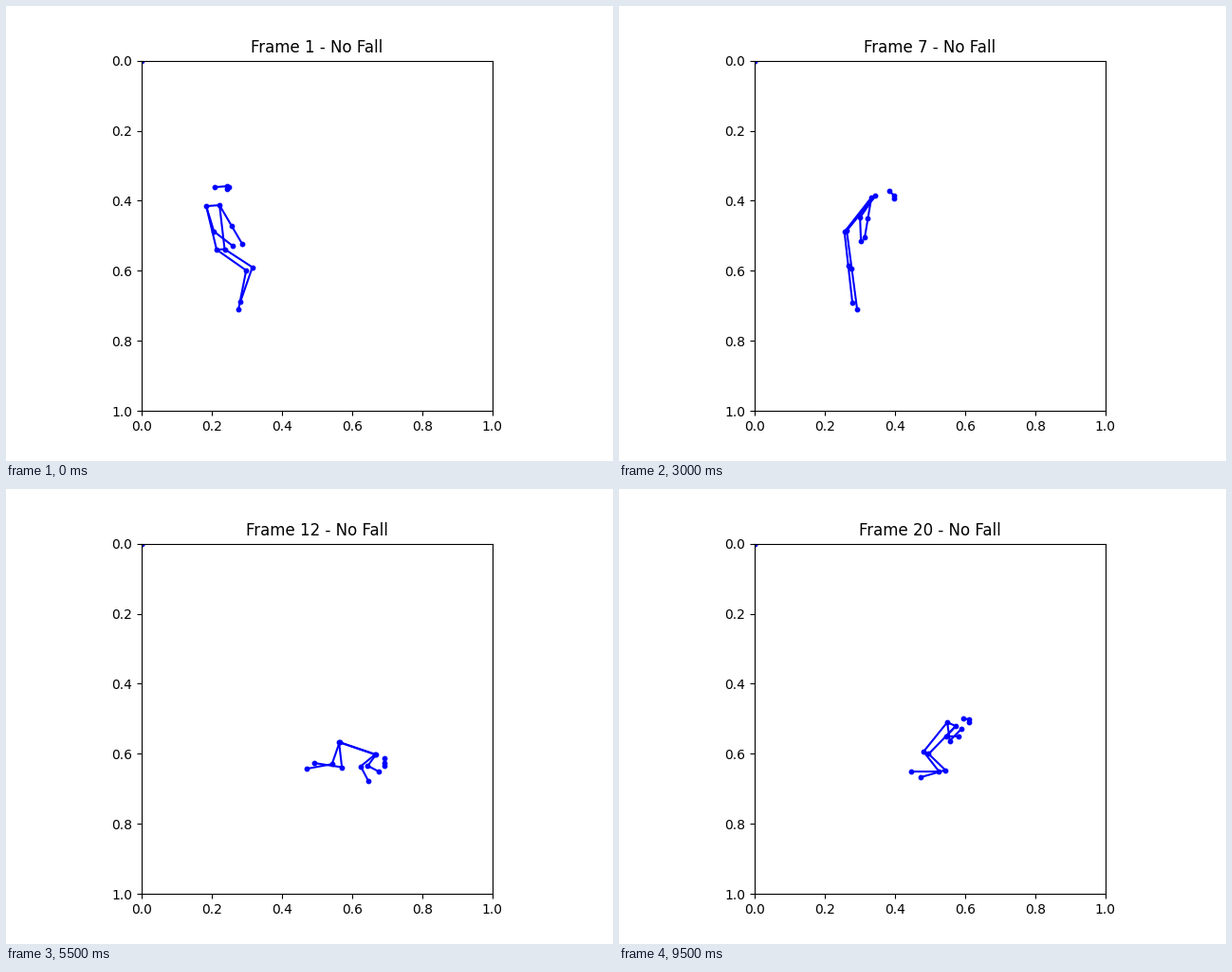
Write a matplotlib script that moves like this. It is 640 by 480 pixels and loops after 10000 ms.

```python
import math

import numpy as np
import matplotlib.pyplot as plt
from matplotlib.animation import FuncAnimation

N_FRAMES, INTERVAL = 20, 500
FALLS = {10, 11}
BOTH_EYES = {1, 4, 8, 10, 15}      # the far eye is detected only here
ORIGIN, SCALE = 143.6 + 58j, 369.6

# Key poses as x + yj in pixels: standing, bending over, falling, down, sitting up.
# Elbows, knees and the left hip follow from these points.
KEY_TIMES = [1, 7, 10, 12, 20]
KEYS = {
    "ear": [220+191j, 285+195j, 342+209j, 399+284j, 363+242j],
    "nose": [233+193j, 290+203j, 347+218j, 399+292j, 369+246j],
    "r_shoulder": [211+211j, 270+200j, 324+212j, 389+280j, 346+246j],
    "l_shoulder": [225+210j, 266+202j, 340+226j, 390+280j, 355+250j],
    "r_hip": [222+257j, 240+237j, 302+240j, 351+267j, 321+277j],
    "r_wrist": [239+253j, 255+248j, 312+226j, 382+308j, 361+253j],
    "l_wrist": [249+251j, 259+244j, 365+247j, 393+298j, 358+261j],
    "r_ankle": [245+320j, 251+320j, 298+301j, 325+289j, 308+298j],
    "l_ankle": [247+312j, 246+313j, 311+293j, 317+295j, 318+304j],
}
# Ease-in power of each body part between the key poses
EASING = {
    "ear": (3, 1, 1, 1), "nose": (3, 1, 1, 1),
    "shoulder": (5, 1, 1, 1), "hip": (5, 1, 1, 1),
    "wrist": (5, 1, 1, 3), "ankle": (1, 1.5, 1, 1),
}

CHAINS = [
    ("nose", "eye", "ear"),
    ("nose", "far_eye"),
    ("l_shoulder", "r_shoulder"),
    ("l_hip", "r_hip"),
]
for side in "rl":
    CHAINS += [
        tuple(f"{side}_{part}" for part in ("shoulder", "elbow", "wrist")),
        tuple(f"{side}_{part}" for part in ("shoulder", "hip", "knee", "ankle")),
    ]
BONES = [pair for chain in CHAINS for pair in zip(chain, chain[1:])]


def middle_joint(start, end, upper, lower, bend):
    """Elbow or knee of a two-bone limb; bend is 1j backwards, -1j forwards."""
    reach = abs(end - start)
    stretch = max(1, reach / (upper + lower))
    upper, lower = upper * stretch, lower * stretch
    along = (reach**2 + upper**2 - lower**2) / (2 * reach)
    aside = math.sqrt(max(upper**2 - along**2, 0))
    return start + (end - start) / reach * (along + bend * aside)


def make_pose(number):
    segment = min(sum(number >= t for t in KEY_TIMES), len(KEY_TIMES) - 1) - 1
    begin, end = KEY_TIMES[segment:segment + 2]
    u = (number - begin) / (end - begin)

    pose = {}
    for name, keys in KEYS.items():
        power = EASING[name.split("_")[-1]][segment]
        a, b = keys[segment:segment + 2]
        pose[name] = a + (b - a) * u**power
    if segment == 0:
        pose["l_ankle"] += (9 - 7j) * math.sin(math.pi * u)    # a short step

    pose["eye"] = pose["nose"] - 3j
    if number in BOTH_EYES:
        pose["far_eye"] = pose["nose"] + 2 - 2j
    shoulder_line = pose["l_shoulder"] - pose["r_shoulder"]
    pose["l_hip"] = pose["r_hip"] + 0.6 * shoulder_line

    # limbs look shorter as the body tips over, and on the far side
    size = np.interp(number, [7, 10, 12], [1, 0.8, 0.7])
    for side, arm, leg in (("r", 1, 1), ("l", 0.75, 0.92)):
        pose[f"{side}_elbow"] = middle_joint(
            pose[f"{side}_shoulder"], pose[f"{side}_wrist"],
            28 * size * arm, 25 * size * arm, 1j)
        pose[f"{side}_knee"] = middle_joint(
            pose[f"{side}_hip"], pose[f"{side}_ankle"],
            38 * size * leg, 42 * size * leg, -1j)
    return {name: (p + 0.5 + 0.5j - ORIGIN) / SCALE for name, p in pose.items()}


fig, ax = plt.subplots(figsize=(6.4, 4.8), dpi=100)
ax.set(xlim=(0, 1), ylim=(1, 0), aspect="equal")
title = ax.set_title("")
dots = ax.scatter([], [], s=10)
lines = [ax.plot([], [])[0] for _ in BONES]


def update(index):
    number = index + 1
    fall = number in FALLS
    pose = make_pose(number)

    # undetected joints collapse onto the origin
    points = np.array(list(pose.values()) + [0] * (17 - len(pose)))
    dots.set_offsets(np.column_stack([points.real, points.imag]))
    dots.set_color("red" if fall else "blue")
    for line, bone in zip(lines, BONES):
        ends = [pose[name] for name in bone] if set(bone) <= set(pose) else []
        line.set_data([p.real for p in ends], [p.imag for p in ends])
        line.set_color("green" if fall else "blue")
    title.set_text(f"Frame {number} - {'Fall' if fall else 'No Fall'}")
    return [dots, title, *lines]


animation = FuncAnimation(fig, update, frames=N_FRAMES, interval=INTERVAL,
                          repeat=True, repeat_delay=0)
plt.show()
```
